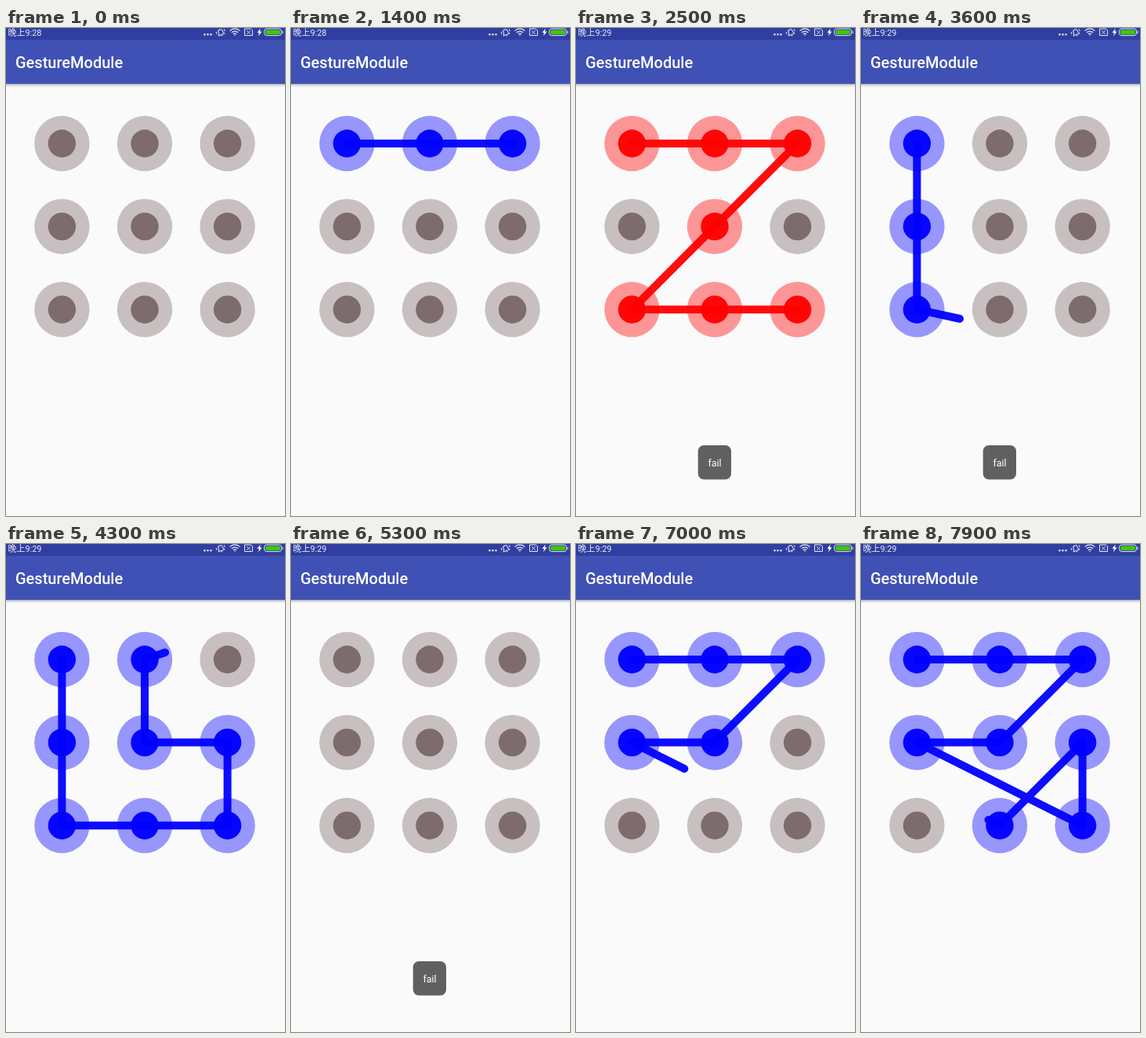
Animation, 356 px wide and 621 px high, one loop 8 s. Source, as an HTML page:

```html
<!DOCTYPE html>
<html lang="en">
<head>
<meta charset="utf-8">
<title>Pattern lock</title>
<style>
html, body { margin: 0; width: 100%; height: 100%; overflow: hidden; background: #fafafa; }
svg { display: block; width: 100vw; height: 100vh; }
text { font-family: Roboto, "Noto Sans CJK SC", "Noto Sans CJK", sans-serif; fill: #fff; }
</style>
</head>
<body>
<svg viewBox="0 0 356 621" xmlns="http://www.w3.org/2000/svg">
  <defs>
    <linearGradient id="shade" x1="0" y1="0" x2="0" y2="1">
      <stop offset="0" stop-opacity=".34"/>
      <stop offset=".4" stop-opacity=".1"/>
      <stop offset="1" stop-opacity="0"/>
    </linearGradient>
  </defs>
  <rect width="356" height="621" fill="#fafafa"/>
  <rect y="71" width="356" height="5" fill="url(#shade)"/>
  <rect y="14" width="356" height="57" fill="#3f51b5"/>
  <rect width="356" height="15" fill="#303f9f"/>
  <text id="clock" x="2.6" y="9.8" font-size="10.9" fill-opacity=".9"></text>
  <text x="12" y="51" font-size="20" font-weight="500">GestureModule</text>

  <g fill="none" stroke="#e4e6f4">
    <path d="M253.5 8.3h9" stroke-width="2.6" stroke-linecap="round" stroke-dasharray="0 4"/>
    <g transform="rotate(-20 274 5.5)">
      <path d="M270 8.5H278L276.8 6.5V4.5A2.8 2.8 0 0 0 271.2 4.5V6.5ZM273 10H275M268.6 3V6M279.4 3V6"/>
    </g>
    <path d="M285.5 3.6A9 9 0 0 1 298.5 3.6M287.8 5.9A6 6 0 0 1 296.2 5.9M289.9 7.9A3 3 0 0 1 294.1 7.9" stroke-width="1.2"/>
    <circle cx="292" cy="9.3" r=".8" fill="#e4e6f4" stroke="none"/>
    <path d="M304.5 1V9.5H314.5V3L312.5 1ZM307.3 3.3L311.7 7.7M311.7 3.3L307.3 7.7"/>
    <path d="M324.7 .5L320.5 6H323L322 10.3L326.6 4.6H324Z" fill="#fff" stroke="none"/>
    <rect x="329.5" y="1" width="22" height="8.6" rx="3.2"/>
    <rect x="331" y="2.4" width="19" height="5.8" rx="2" fill="#3fc80c" stroke="none"/>
    <path d="M353 3.7V7"/>
  </g>

  <g id="dots"></g>
  <path id="line" fill="none" stroke-width="10" stroke-linecap="round" stroke-linejoin="round" opacity=".95"/>
  <g id="toast">
    <rect x="155.7" y="531" width="42.3" height="43.5" rx="7.5" fill="#606060"/>
    <text x="177" y="557.8" font-size="12.5" text-anchor="middle">fail</text>
  </g>
</svg>
<script>
const LOOP = 8000, STEP = 100, HIT = 35;
const $ = id => document.getElementById(id);
const clamp = v => Math.max(0, Math.min(1, v));
const dist = (a, b) => Math.hypot(a.x - b.x, a.y - b.y);

function addCircle(x, y, r) {
  const c = document.createElementNS('http://www.w3.org/2000/svg', 'circle');
  c.setAttribute('cx', x);
  c.setAttribute('cy', y);
  c.setAttribute('r', r);
  $('dots').appendChild(c);
  return c;
}

const dots = Array.from({ length: 9 }, (_, i) => {
  const x = 71.4 + i % 3 * 105.6, y = 147 + Math.floor(i / 3) * 105.6;
  return { x, y, ring: addCircle(x, y, 35.2), core: addCircle(x, y, 17.7) };
});

// The finger crosses each leg at an even speed; numbers are dots of the grid.
const strokes = [
  { start: 1200, fail: 1900, reset: 2800, legs: [
    { end: 1900, via: [0, 1, 2, 4, 6, 7, 8] }] },
  { start: 3300, fail: 4500, reset: 5300, legs: [
    { end: 3600, via: [0, 3, 6, { x: 126, y: 370 }] },
    { end: 4300, via: [7, 8, 5, 4, 1, { x: 203, y: 138 }] },
    { end: 4500, via: [2] }] },
  { start: 6100, fail: LOOP, reset: LOOP, legs: [
    { end: 6300, via: [0, 1, { x: 288, y: 143 }] },
    { end: 7900, via: [4, 3, 8, 5, 7, { x: 162.5, y: 351 }] }] }
];

const toasts = [1900, 4500];

// Turns the legs of a stroke into points with times.
function timeline({ start, legs }) {
  const keys = [];
  let from = start;
  for (const { end, via } of legs) {
    const pts = via.map(p => dots[p] || p);
    let prev = keys.length ? keys[keys.length - 1] : pts[0], sum = 0;
    const marks = pts.map(p => {
      sum += dist(prev, p);
      prev = p;
      return sum;
    });
    pts.forEach((p, i) => keys.push({ x: p.x, y: p.y, t: from + (end - from) * marks[i] / sum }));
    from = end;
  }
  return keys;
}
strokes.forEach(s => { s.keys = timeline(s); });

function fingerAt(keys, t) {
  const i = keys.findIndex(k => k.t > t);
  if (i < 0) return keys[keys.length - 1];
  const a = keys[i - 1], b = keys[i], k = (t - a.t) / (b.t - a.t);
  return { x: a.x + (b.x - a.x) * k, y: a.y + (b.y - a.y) * k };
}

// Dots the finger has touched so far, in order.
function touched(s, t) {
  const hits = new Set();
  for (let u = s.start; u <= t; u += 10) {
    const p = fingerAt(s.keys, u);
    const d = dots.find(q => dist(p, q) < HIT);
    if (d) hits.add(d);
  }
  return [...hits];
}

function paint(dot, color) {
  dot.ring.setAttribute('fill', color || '#c8bfc1');
  dot.ring.setAttribute('fill-opacity', color ? .4 : 1);
  dot.core.setAttribute('fill', color || '#7d6b6e');
  dot.core.setAttribute('fill-opacity', color ? .96 : 1);
}

function drawLock(t) {
  const s = strokes.find(q => t >= q.start && t < q.reset);
  const failed = s && t >= s.fail;
  const color = failed ? '#f00' : '#00f';
  const hits = s ? touched(s, Math.min(t, s.fail)) : [];
  const points = s && !failed ? [...hits, fingerAt(s.keys, t)] : hits;
  dots.forEach(d => paint(d, hits.includes(d) && color));
  $('line').setAttribute('stroke', color);
  $('line').setAttribute('d', points.map((p, i) => `${i ? 'L' : 'M'}${p.x} ${p.y}`).join(''));
}

// Enters from below, overshoots, settles, then fades out.
function drawToast(t) {
  const age = t - toasts.filter(s => s <= t).pop();
  const alpha = age >= 0 ? Math.min(clamp((age + 60) / 400), clamp((1832 - age) / 132)) : 0;
  const dy = age < STEP ? 27 : -4 * clamp(1.25 - age / 320);
  $('toast').setAttribute('opacity', alpha);
  $('toast').setAttribute('transform', `translate(0 ${dy})`);
}

function draw(time) {
  const t = Math.floor((time + 2) / STEP) * STEP % LOOP;
  drawLock(t);
  drawToast(t);
  $('clock').textContent = t < 2500 ? '晚上9:28' : '晚上9:29';
}

const origin = performance.now();
function tick() {
  draw(performance.now() - origin);
  requestAnimationFrame(tick);
}
draw(0);
requestAnimationFrame(tick);
</script>
</body>
</html>
```
